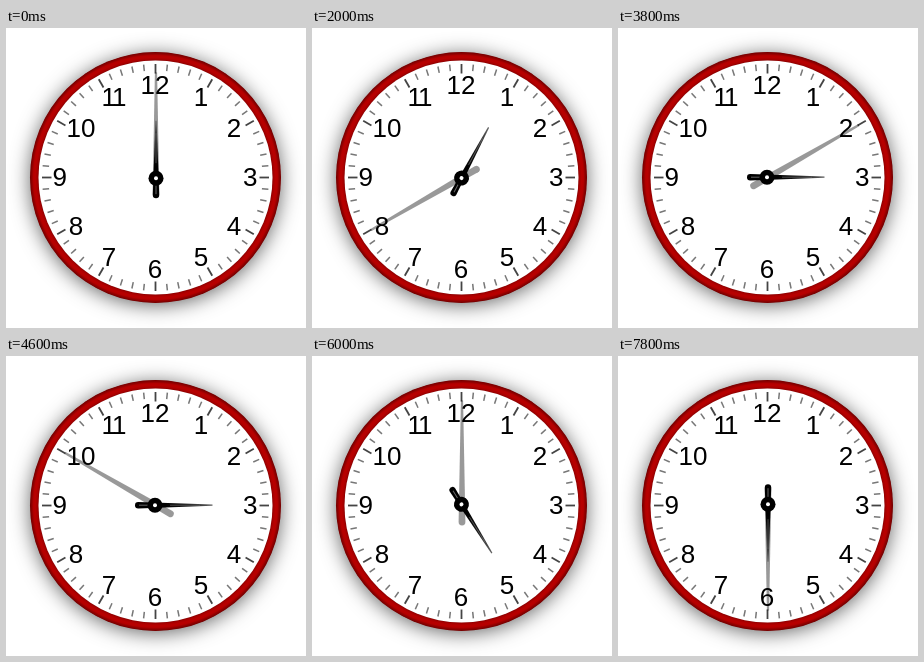
Animation, 300 px wide and 300 px high, one loop 8 s. Source, as an HTML page with a canvas:

```html
<!DOCTYPE html>
<html lang="en">
<head>
<meta charset="utf-8">
<title>Clock</title>
<style>
html, body { margin: 0; width: 100%; height: 100%; overflow: hidden; background: #fff; }
canvas { display: block; width: 300px; height: 300px; }
</style>
</head>
<body>
<canvas id="clock" width="300" height="300"></canvas>
<script>
const LOOP = 8000, STEP = 200, STEPS_PER_HOUR = 6;
const C = 149.5;
const TURN = Math.PI * 2;
const ctx = document.getElementById('clock').getContext('2d');

function disc(x, y, r, fill) {
  ctx.beginPath();
  ctx.arc(x, y, r, 0, TURN);
  ctx.fillStyle = fill;
  ctx.fill();
}

function line(y1, y2, width, color) {
  ctx.beginPath();
  ctx.moveTo(0, y1);
  ctx.lineTo(0, y2);
  ctx.lineWidth = width;
  ctx.strokeStyle = color;
  ctx.stroke();
}

// Run a drawing with the origin at (x, y), turned by an angle.
function turned(x, y, angle, paint) {
  ctx.save();
  ctx.translate(x, y);
  ctx.rotate(angle);
  paint();
  ctx.restore();
}

function drawRim() {
  ctx.save();
  ctx.shadowColor = 'rgba(0,0,0,0.62)';
  ctx.shadowBlur = 20;
  ctx.shadowOffsetY = 2.5;
  disc(C, C, 125, '#900');
  ctx.restore();

  const red = ctx.createRadialGradient(C, C, 116.5, C, C, 125.5);
  red.addColorStop(0, '#800000');
  red.addColorStop(0.2, '#a80000');
  red.addColorStop(0.4, '#b80000');
  red.addColorStop(0.6, '#b40000');
  red.addColorStop(0.8, '#900000');
  red.addColorStop(1, '#700000');
  disc(C, C, 125.5, red);
  disc(C, C, 117, '#fff');
}

function drawTicks() {
  for (let i = 0; i < 60; i++) {
    const hour = i % 5 === 0;
    turned(C, C, i * TURN / 60, () =>
      line(-113.5, hour ? -104 : -107, hour ? 1.8 : 1.5, hour ? '#444' : '#777'));
  }
}

function drawNumerals() {
  // offsets from the centre for the numerals 12, 1, 2, 3; mirrored elsewhere
  const dx = [0, 46, 79, 95.2], dy = [92, 79.7, 49.3, 0];
  ctx.font = '26px "Liberation Sans", Arial, sans-serif';
  ctx.textAlign = 'center';
  ctx.fillStyle = '#000';
  for (let n = 1; n <= 12; n++) {
    const a = n * TURN / 12;
    const k = 3 - Math.abs(3 - n % 6);
    const row = n % 12 > 6 ? -1 : 1;
    const inset = n === 10 ? 5 : n === 11 ? 4 : 0;
    ctx.letterSpacing = n === 11 ? '-2px' : '0px';
    ctx.fillText(n, C - 0.5 + row * dx[k % 6 === 0 ? 0 : n % 6 > 3 ? 6 - n % 6 : n % 6] + inset,
      C + 8.4 - Math.sign(Math.round(Math.cos(a) * 9)) * dy[k]);
  }
}

// Tapered outline with a rounded tail, pointing up.
function handShape(length, tail, wide, tip, fill) {
  ctx.beginPath();
  ctx.moveTo(-tip, -length);
  ctx.lineTo(-wide, tail - wide);
  ctx.arc(0, tail - wide, wide, Math.PI, 0, true);
  ctx.lineTo(tip, -length);
  ctx.closePath();
  ctx.fillStyle = fill;
  ctx.fill();
}

function drawMinuteHand(angle) {
  turned(150, C, angle, () => handShape(105, 20, 3.4, 1.1, 'rgba(0,0,0,0.4)'));
}

function drawHourHand(angle) {
  // the hand lags a little between the quarter positions
  const lag = 0.045 * Math.sin(2 * angle) ** 2;
  turned(150, 149.2, angle - lag, () => {
    const shade = ctx.createLinearGradient(0, -10, 0, -57);
    shade.addColorStop(0, '#000');
    shade.addColorStop(0.5, '#1c1c1c');
    shade.addColorStop(1, '#666');
    handShape(56.5, 21, 3.2, 0.6, shade);
    line(17, 8, 1, '#666');
    line(-14, -44, 0.6, '#777');
    disc(0, 1, 7.5, '#000');
    disc(0, 1, 2, '#fff');
  });
}

function draw(time) {
  const step = Math.floor((time % LOOP) / STEP);
  const minute = (step % STEPS_PER_HOUR) / STEPS_PER_HOUR;
  const hour = Math.floor(step / STEPS_PER_HOUR) / 12;

  ctx.fillStyle = '#fff';
  ctx.fillRect(0, 0, 300, 300);
  drawRim();
  drawTicks();
  drawMinuteHand(minute * TURN);
  drawNumerals();
  drawHourHand(hour * TURN);
}

const start = performance.now();
function tick() {
  draw(performance.now() - start);
  requestAnimationFrame(tick);
}
tick();
</script>
</body>
</html>
```
